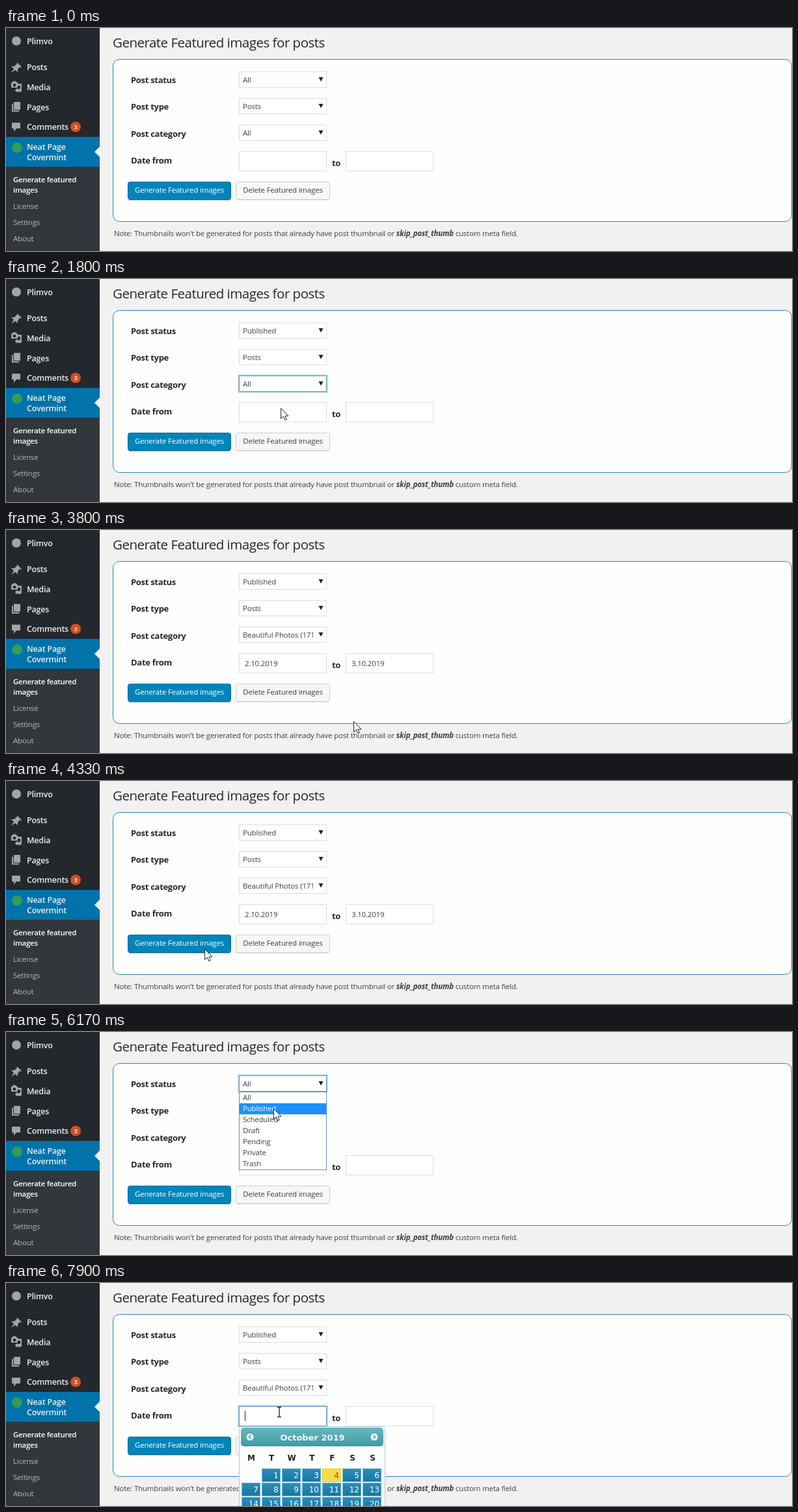
Animation of 1208x344 px, one loop 8000 ms. Source, as an HTML page:

```html
<!DOCTYPE html>
<html lang="en">
<head>
<meta charset="utf-8">
<title>Featured image generator</title>
<style>
html, body { margin: 0; width: 100%; height: 100%; overflow: hidden; background: #f1f1f1; }
svg { display: block; width: 100%; height: 100%; }
text { font: 11.5px "Open Sans", "Noto Sans", sans-serif; letter-spacing: -.2px; fill: #3c4044; }
.title { font-size: 20.5px; letter-spacing: -.5px; fill: #23282d; }
.label { font-size: 13px; font-weight: 700; letter-spacing: -.3px; fill: #23282d; }
.notice { font-weight: 600; letter-spacing: -.3px; }
.menu { font-size: 12.5px; font-weight: 600; fill: #eee; }
.current { font-weight: 600; letter-spacing: -.3px; fill: #fff; }
.sub { fill: #b4b9be; }
.white { fill: #fff; }
.code { font-weight: 700; font-style: italic; }
.month, .week, .day { font-family: "DejaVu Sans", sans-serif; letter-spacing: 0; }
.month { font-size: 13px; font-weight: 700; fill: #f0fafa; text-anchor: middle; }
.week { font-size: 12px; font-weight: 700; fill: #222; text-anchor: middle; }
.day { font-size: 12px; fill: #fff; text-anchor: end; }
.today { fill: #915608; }
.badge { font-size: 9px; font-weight: 600; fill: #fff; text-anchor: middle; }
</style>
</head>
<body>
<svg viewBox="0 0 1208 344">
  <defs>
    <clipPath id="selectClip"><rect x="360" y="60" width="112" height="120"/></clipPath>
    <linearGradient id="calendarHead" x2="0" y2="1">
      <stop stop-color="#68b8bc"/><stop offset="1" stop-color="#3d9ba6"/>
    </linearGradient>
    <linearGradient id="dayFill" x2="0" y2="1">
      <stop stop-color="#2d8db6"/><stop offset="1" stop-color="#1577a4"/>
    </linearGradient>
  </defs>
  <g id="main"></g>
  <g id="sidebar"></g>
</svg>
<script>
const LOOP = 8000, DONE = 4570, RESET = 5400;
const PAGE = '#f1f1f1', PANEL = '#fefefe', LINE = '#ddd';
const $ = id => document.getElementById(id);

const text = (x, y, str, cls = '', extra = '') =>
  `<text x="${x}" y="${y}" class="${cls}" ${extra}>${str}</text>`;
const rect = (x, y, w, h, fill, extra = '') =>
  `<rect x="${x}" y="${y}" width="${w}" height="${h}" fill="${fill}" ${extra}/>`;
const path = (d, fill, extra = '') => `<path d="${d}" fill="${fill}" ${extra}/>`;
const circle = (x, y, r, fill) => `<circle cx="${x}" cy="${y}" r="${r}" fill="${fill}"/>`;
const group = (opacity, body) => opacity > 0 ? `<g opacity="${opacity}">${body}</g>` : '';

const within = (t, a, b) => t >= a && t < b;
const ramp = (t, a, b) => Math.min(1, Math.max(0, (t - a) / (b - a)));
const pulse = (t, start, end, fade = 200) => ramp(t, start, start + fade) - ramp(t, end, end + fade);

const STATUSES = ['All', 'Published', 'Scheduled', 'Draft', 'Pending', 'Private', 'Trash'];
const CATEGORIES = ['All', 'Beautiful Photos (171)', 'Business (24)', 'Design (36)', 'Food and Drinks (58)',
  'Interiors (12)', 'Nature (93)', 'News (41)', 'Travel (67)', 'Uncategorized (5)'];

// Pointer stops: time, x, y
const STOPS = [
  [130, 655, 345], [960, 447, 121], [1030, 408, 79], [1270, 408, 79], [1400, 411, 118], [1460, 411, 118],
  [1570, 432, 160], [1610, 432, 160], [1740, 422, 199], [2030, 420, 199], [2480, 420, 199],
  [2780, 441, 295], [2900, 441, 295], [3130, 590, 213], [3250, 590, 213], [3480, 632, 295],
  [3610, 632, 295], [3800, 534, 295], [4450, 282, 256], [5100, 282, 256],
  [5630, 408, 79], [5800, 408, 79], [6130, 411, 118], [6260, 411, 118], [6570, 432, 160],
  [6730, 432, 160], [7420, 422, 199], [7600, 420, 199], [LOOP, 420, 199]];

function pointerAt(t) {
  const i = STOPS.findIndex(([time]) => time > t);
  if (i < 1) return null;
  const [t0, x0, y0] = STOPS[i - 1], [t1, x1, y1] = STOPS[i];
  const p = ramp(t, t0, t1), e = p * p * (3 - 2 * p);
  return { x: Math.round(x0 + (x1 - x0) * e), y: Math.round(y0 + (y1 - y0) * e) };
}

function pointer({ x, y }, beam) {
  const shape = beam
    ? path('M-3 -7.5h2l1 1 1-1h2M0-6.5v13M-3 7.5h2l1-1 1 1h2', 'none', 'stroke="#222" stroke-width="1.3"')
    : path('M.5 .5V16.5L4.3 13 6.8 18.8 9.3 17.7 6.8 12.2H12Z', '#fff', 'stroke="#222"');
  return `<g transform="translate(${x} ${y})">${shape}</g>`;
}

function sidebar() {
  const icon = '#a0a5aa', dark = '#23282d';
  const menu = [['Plimvo', 25], ['Posts', 65], ['Media', 96], ['Pages', 127], ['Comments', 157],
    ['Neat Page', 188], ['Covermint', 204]];
  const links = [['License', 279], ['Settings', 304], ['About', 329]];
  return rect(0, 0, 144, 344, dark) + rect(0, 214, 144, 130, '#32373c') + rect(0, 168, 144, 46, '#0073aa')
    + path('M144 183l-8 8 8 8Z', PAGE)
    + circle(16, 20, 7, icon)
    + path('M17 53l7 7-2 1-1-1-3 4 0 4-4-3-6 4 4-6-4-4 5 0 4-4Z', icon)
    + path('M8 84h2l1-2h4l1 2h2v8H8ZM18 86h6v10a3 2.5 0 1 1-2-2v-5h-4Z', icon)
    + circle(13, 88, 2.3, dark) + circle(17, 96, 2.6, icon)
    + path('M12 114h10v12H12ZM9 117h2v10h9v2H9Z', icon)
    + path('M9 146h13v9h-6l-4 5v-5H9Z', icon)
    + circle(107, 152.5, 8, '#d54e21') + text(107, 156, '3', 'badge')
    + circle(17, 184.5, 8, '#319c58')
    + menu.map(([label, y]) => text(32, y, label, 'menu')).join('')
    + text(11, 238, 'Generate featured', 'current') + text(11, 254, 'images', 'current')
    + links.map(([label, y]) => text(11, y, label, 'sub')).join('');
}

function field(x, y, h, glow) {
  return rect(x + .5, y + .5, 134, h - 1, '#fff', `stroke="${LINE}"`)
    + group(glow, rect(x - .5, y - .5, 136, h + 1, 'none', 'stroke="#a5cbe8" stroke-width="2"')
      + rect(x + .5, y + .5, 134, h - 1, 'none', 'stroke="#5b9dd9"'));
}

const select = (y, value, glow) => field(358, y, 25, glow)
  + text(364, y + 17, value, '', 'clip-path="url(#selectClip)"')
  + path(`M480.5 ${y + 9}h7l-3.5 6.5Z`, '#222');

const dateInput = (x, value, glow) => field(x, 190, 31, glow)
  + (value ? text(x + 9, 210, value) : glow ? rect(x + 9, 197, 1, 16, '#222') : '');

function button(x, w, label, fill, border, cls) {
  return rect(x + .5, 237.5, w - 1, 27, fill, `rx="3" stroke="${border}"`)
    + rect(x + 2, 264, w - 4, 1.5, border)
    + text(x + w / 2, 254, label, cls, 'text-anchor="middle"');
}

function form(s) {
  const labels = [['Post status', 85], ['Post type', 126], ['Post category', 168], ['Date from', 209]];
  const glow = name => s.focus === name ? s.glow : 0;
  return rect(164.5, 48.5, 1043, 250, PANEL, 'rx="10" stroke="#2a86b5"')
    + labels.map(([label, y]) => text(192, y, label, 'label')).join('')
    + select(67, s.status, glow('status'))
    + select(108, 'Posts', 0)
    + select(149, s.category, glow('category'))
    + dateInput(358, s.from, glow('from')) + text(501, 213, 'to', 'label')
    + dateInput(522, s.to, glow('to'))
    + button(187, 159, 'Generate Featured images', '#0085ba', '#006799', 'white')
    + button(353, 145, 'Delete Featured images', '#f7f7f7', '#ccc', '')
    + text(166, 321, 'Note: Thumbnails won\'t be generated for posts that already have post thumbnail or '
      + '<tspan class="code">skip_post_thumb</tspan> custom meta field.');
}

function dropdown(top, width, items, mouse) {
  const row = Math.max(0, Math.floor((mouse.y - top - 1) / 17));
  return rect(358.5, top + .5, width, items.length * 17 + 1, '#fff', 'stroke="#5b8fd0"')
    + rect(359, top + 1 + row * 17, width - 1, 17, '#1e90ff')
    + items.map((item, i) => text(364, top + 13 + i * 17, item, i === row ? 'white' : '')).join('');
}

function calendar(x) {
  let out = rect(x + .5, 221.5, 224, 160, PANEL, 'rx="4" stroke="#a6c9e2"')
    + rect(x + 3, 223, 219, 29, 'url(#calendarHead)', 'rx="5"')
    + text(x + 113, 243, 'October 2019', 'month');
  for (const [cx, dir] of [[17, -1], [208, 1]])
    out += circle(x + cx, 237.5, 5.5, '#e4f3f4')
      + path(`M${x + cx - dir * 1.5} 235l${dir * 3} 2.5 ${-dir * 3} 2.5`, 'none', 'stroke="#3d9ba6" stroke-width="1.5"');
  [...'MTWTFSS'].forEach((letter, i) => out += text(x + 19 + i * 31.1, 274, letter, 'week'));
  for (let day = 1; day <= 20; day++) {
    const cx = x + 4 + day % 7 * 31, cy = 286 + Math.floor(day / 7) * 22, today = day === 4;
    out += rect(cx + .5, cy + .5, 28, 20, today ? '#f8da4e' : 'url(#dayFill)', `stroke="${today ? '#fcd113' : '#6bb9da'}"`)
      + text(cx + 26, cy + 15, day, today ? 'day today' : 'day');
  }
  return out;
}

const heading = () => rect(144, 0, 1064, 344, PAGE)
  + text(164, 30, 'Generate Featured images for posts', 'title');

const notice = () => rect(164, 43, 1044, 52, '#ddd') + rect(164, 43, 1044, 51, PANEL)
  + rect(164, 43, 4, 51, '#46b450')
  + text(180, 65, 'All done! Processed posts: 31', 'notice')
  + text(180, 82, 'Set featured image in posts: 30', 'notice');

function stateAt(t) {
  const focusTimes = [['status', 1270, 1590], ['category', 1590, 2330], ['from', 2330, 3180], ['to', 3180, 3700],
    ['status', 5800, 6730], ['category', 6730, 7640], ['from', 7640, LOOP]];
  const [focus, since] = focusTimes.find(([, a, b]) => within(t, a, b)) || [];
  return {
    focus, glow: focus ? ramp(t, since, since + 100) : 0,
    status: within(t, 1460, RESET) || t >= 6260 ? 'Published' : 'All',
    category: CATEGORIES[within(t, 1830, RESET) || t >= 7600 ? 1 : 0],
    from: within(t, 2880, RESET) ? '2.10.2019' : '',
    to: within(t, 3580, RESET) ? '3.10.2019' : '',
  };
}

function render(t) {
  const mouse = pointerAt(t), done = within(t, DONE, RESET);
  const beam = within(t, 1900, 2560) || within(t, 3050, 3340) || t >= 7600;
  let out = heading() + (done ? notice() : '')
    + `<g transform="translate(0 ${done ? 69 : 0})">${form(stateAt(t))}</g>`;
  if (within(t, 1270, 1460) || within(t, 5800, 6260)) out += dropdown(92, 134, STATUSES, mouse);
  if (within(t, 1600, 1790) || within(t, 6730, 7530)) out += dropdown(174, 219, CATEGORIES, mouse);
  out += group(pulse(t, 2340, 2880) + ramp(t, 7690, 7890), calendar(358));
  out += group(pulse(t, 3170, 3580), calendar(522));
  if (mouse) out += pointer(mouse, beam);
  $('main').innerHTML = out;
}

$('sidebar').innerHTML = sidebar();
let start;
function tick(now) {
  start ??= now;
  render((now - start) % LOOP);
  requestAnimationFrame(tick);
}
render(0);
requestAnimationFrame(tick);
</script>
</body>
</html>
```
